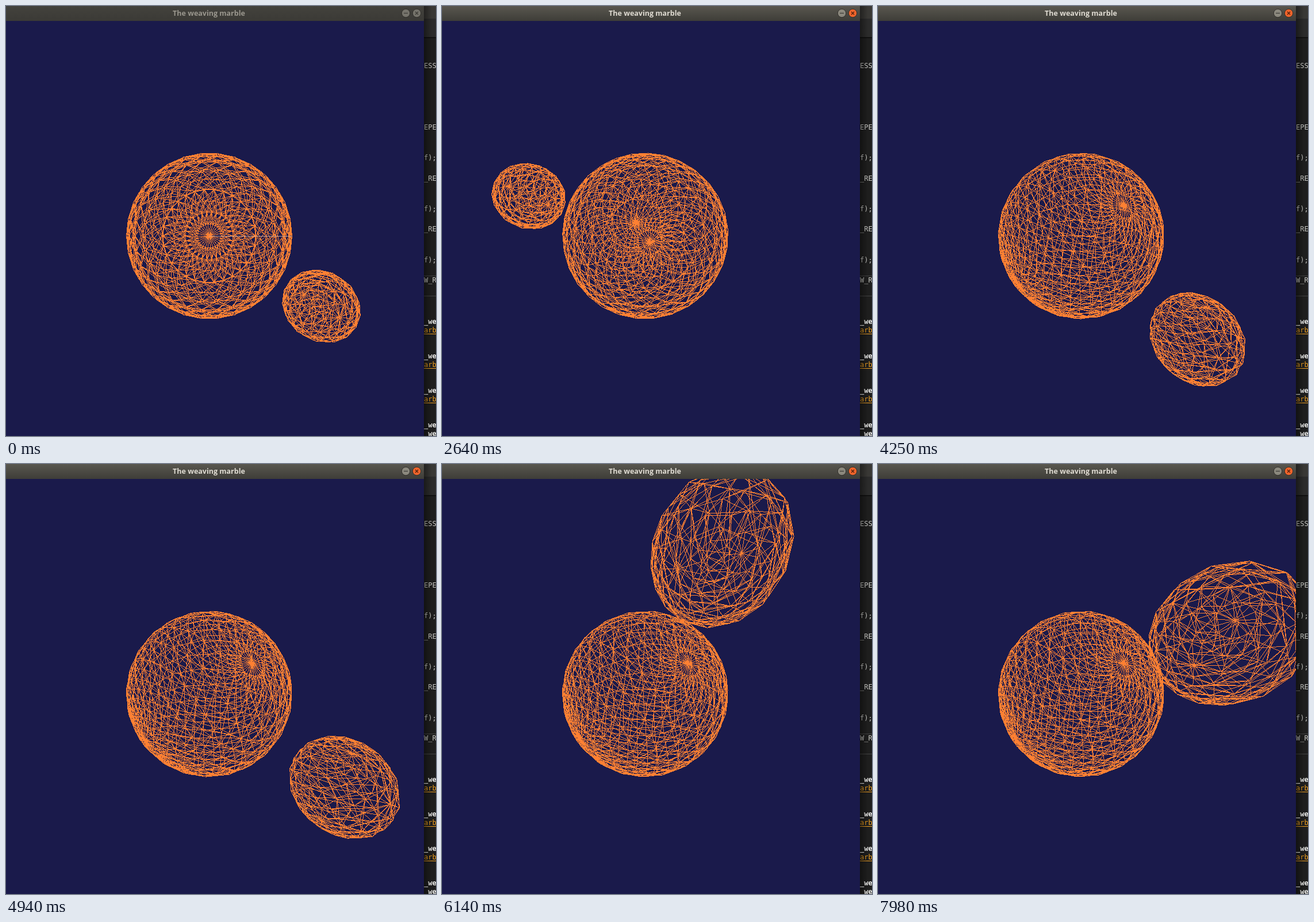
Animation of 748x748 px, one loop 8000 ms. Source, as an HTML page with a canvas:

```html
<!DOCTYPE html>
<html lang="en">
<head>
<meta charset="utf-8">
<title>Wireframe orbit</title>
<style>
html, body { margin: 0; width: 100%; height: 100%; overflow: hidden; background: #1e1e1e; }
canvas { display: block; width: 748px; height: 748px; }
</style>
</head>
<body>
<canvas id="stage" width="748" height="748"></canvas>
<script>
const ctx = document.getElementById('stage').getContext('2d');
const LOOP = 8000, RAD = Math.PI / 180;
const W = 727, H = 722, TOP = 26;
const CX = 353.5, CY = 400, FOCAL = 374, DIST = 5;
const ORBIT = 3, PLANET_R = 1.8, MOON_R = 0.8;
// Colours as ABGR words for the pixel buffer.
const ORANGE = 0xff3380ff, NIGHT = 0xff4b1a1a, SEAM = 0xff8fa6d5;
const image = ctx.createImageData(W, H);
const pixels = new Uint32Array(image.data.buffer);

// Vector helpers: x right, y down, z away from the viewer.
const dot = (a, b) => a[0] * b[0] + a[1] * b[1] + a[2] * b[2];
const mix = (a, b, k) => a.map((v, i) => v + (b[i] - v) * k);
const mul = (a, k) => a.map(v => v * k);
const unit = a => mul(a, 1 / Math.hypot(...a));
const cross = (a, b) => [
  a[1] * b[2] - a[2] * b[1],
  a[2] * b[0] - a[0] * b[2],
  a[0] * b[1] - a[1] * b[0]
];

// Axes from the far pole and a direction in the orbit plane lying at `deg`.
function makeFrame(pole, dir, deg) {
  const n = mul(unit(pole), -1);
  const d = dot(dir, n);
  const u = unit(dir.map((v, i) => v - d * n[i]));
  const v = cross(n, u);
  const c = Math.cos(deg * RAD), s = Math.sin(deg * RAD);
  const e1 = u.map((w, i) => c * w - s * v[i]);
  return { e1, e2: cross(n, e1), n };
}

const blend = (a, b, k) =>
  makeFrame(mul(mix(a.n, b.n, k), -1), mix(a.e1, b.e1, k), 0);

// Linear interpolation through [time, ...values] keys.
function track(keys, t) {
  if (t <= keys[0][0]) return keys[0].slice(1);
  for (let i = 1; i < keys.length; i++) {
    const a = keys[i - 1], b = keys[i];
    if (t < b[0]) return mix(a, b, (t - a[0]) / (b[0] - a[0])).slice(1);
  }
  return keys[keys.length - 1].slice(1);
}

const VIEWS = [
  makeFrame([0, 0, 1], [1, 0, 0], 0),
  makeFrame([0.552, 0.775, 0.308], [0.188, -0.449, 0.873], -252.5),
  makeFrame([0.664, -0.475, 0.577], [0.752, 0.503, -0.424], -276.3)
];
const VIEW_KEYS = [[2520, 0], [3450, 1], [4030, 2]];
const MOON_KEYS = [
  [0, -32], [4120, -295.3], [4680, -259.3], [4940, -276.3], [5268, -297.3],
  [5770, -263.3], [6140, -202.2], [6550, -164.3], [6700, -152.3],
  [6930, -155.5], [7980, -226.3], [8000, -227.6]
];
const SPIN_KEYS = [[4120, 0], [4680, 71.4], [5268, 71.4], [5770, 137], [6140, 224], [6550, 320]];
const CURSOR_KEYS = [[600, 261, 348], [900, 420, 500], [1300, 531, 514], [1900, 531, 514], [2480, 700, 560]];

function viewAt(t) {
  const [pos] = track(VIEW_KEYS, t);
  const i = Math.min(1, Math.floor(pos));
  return blend(VIEWS[i], VIEWS[i + 1], pos - i);
}

// Hard-edged line, one pixel wide.
function line([x0, y0], [x1, y1], color) {
  const steps = Math.max(1, Math.ceil(Math.max(Math.abs(x1 - x0), Math.abs(y1 - y0))));
  const dx = (x1 - x0) / steps, dy = (y1 - y0) / steps;
  for (let i = 0; i <= steps; i++) {
    const x = Math.floor(x0 + dx * i), y = Math.floor(y0 + dy * i) - TOP;
    if (x >= 0 && x < W && y >= 0 && y < H) pixels[y * W + x] = color;
  }
}

function sphere(frame, centre, radius, slices, stacks, spin) {
  const { e1, e2, n } = frame;
  const rows = [];
  for (let i = 0; i <= stacks; i++) {
    const th = Math.PI * i / stacks;
    const h = radius * Math.cos(th), w = radius * Math.sin(th);
    const row = [];
    for (let j = 0; j < slices; j++) {
      const b = spin * RAD + 2 * Math.PI * j / slices;
      const x = w * Math.cos(b), y = w * Math.sin(b);
      const p = centre.map((c, k) => c + x * e1[k] + y * e2[k] + h * n[k]);
      const s = FOCAL / (DIST + p[2]);
      row.push([CX + p[0] * s, CY + p[1] * s]);
    }
    rows.push(row);
  }
  for (let i = 0; i < stacks; i++) {
    for (let j = 0; j < slices; j++) {
      const a = rows[i][j];
      line(a, rows[i][(j + 1) % slices], ORANGE);
      for (const shift of [-1, 1, 2]) {
        line(a, rows[i + 1][(j + shift + slices) % slices], ORANGE);
      }
    }
  }
  return rows;
}

function drawScene(t) {
  const frame = viewAt(t);
  const angle = track(MOON_KEYS, t)[0];
  const c = ORBIT * Math.cos(angle * RAD), s = ORBIT * Math.sin(angle * RAD);
  const centre = frame.e1.map((v, i) => c * v + s * frame.e2[i]);
  pixels.fill(NIGHT);
  const rows = sphere(frame, [0, 0, 0], PLANET_R, 30, 15, track(SPIN_KEYS, t)[0]);
  if (t < 2520) {
    for (let i = 1; i < 8; i++) line(rows[i - 1][0], rows[i][0], SEAM);
  }
  sphere(frame, centre, MOON_R, 15, 10, angle);
  ctx.putImageData(image, 0, TOP);
}

function write(text, x, y, font, color) {
  ctx.font = font;
  ctx.fillStyle = color;
  ctx.fillText(text, x, y);
}

function drawEditor() {
  const mono = '12px "DejaVu Sans Mono", monospace';
  ctx.fillStyle = '#1e1e1e';
  ctx.fillRect(727, 0, 21, 748);
  ctx.fillStyle = '#393835';
  ctx.fillRect(727, 0, 21, 22);
  ctx.fillStyle = '#2b2b2b';
  ctx.fillRect(727, 22, 21, 32);
  ctx.fillStyle = '#111';
  ctx.fillRect(727, 54, 21, 2);
  ctx.fillStyle = '#444';
  ctx.fillRect(727, 469, 21, 1);
  ctx.fillRect(727, 504, 21, 1);
  ctx.textAlign = 'left';
  const code = [['ESS', 108], ['EPE', 215], ['f);', 268], ['_RE', 304],
    ['f);', 357], ['_RE', 392], ['f);', 446], ['W_R', 481]];
  for (const [s, y] of code) write(s, 727, y, mono, '#c8c8c4');
  for (let i = 0; i < 4; i++) {
    const y = 553 + i * 60;
    write('_we', 727, y, 'bold ' + mono, '#eeeeec');
    write(i < 3 ? 'arb' : '_we', 727, y + 15, (i < 3 ? '' : 'bold ') + mono, i < 3 ? '#f0a020' : '#eeeeec');
    if (i < 3) ctx.fillRect(727, y + 17, 21, 1);
  }
  const shade = ctx.createLinearGradient(727, 0, 741, 0);
  shade.addColorStop(0, 'rgba(0,0,0,.4)');
  shade.addColorStop(1, 'rgba(0,0,0,0)');
  ctx.fillStyle = shade;
  ctx.fillRect(727, 0, 14, 748);
}

function button(x, fill, mark, close) {
  ctx.beginPath();
  ctx.arc(x, 12.5, 7.2, 0, 7);
  ctx.fillStyle = fill;
  ctx.fill();
  ctx.strokeStyle = '#2f2e2a';
  ctx.lineWidth = 1;
  ctx.stroke();
  ctx.beginPath();
  if (close) {
    ctx.moveTo(x - 2.5, 10); ctx.lineTo(x + 2.5, 15);
    ctx.moveTo(x + 2.5, 10); ctx.lineTo(x - 2.5, 15);
  } else {
    ctx.moveTo(x - 3.5, 12.5); ctx.lineTo(x + 3.5, 12.5);
  }
  ctx.strokeStyle = mark;
  ctx.lineWidth = 1.2;
  ctx.stroke();
}

function drawTitle(active) {
  const bar = ctx.createLinearGradient(0, 0, 0, 26);
  bar.addColorStop(0, active ? '#59574f' : '#43423d');
  bar.addColorStop(1, active ? '#3e3d38' : '#3b3a36');
  ctx.fillStyle = bar;
  ctx.fillRect(0, 0, 727, 26);
  ctx.textAlign = 'center';
  write('The weaving marble', 353, 17, 'bold 12.5px "Open Sans", "Noto Sans", sans-serif',
    active ? '#dfdbd2' : '#9a978e');
  button(695.5, active ? '#8b887d' : '#75736b', '#3a3934', false);
  button(714.5, active ? '#f0642b' : '#75736b', active ? '#4a1d0c' : '#3a3934', true);
}

function drawCursor(t) {
  if (t < 600 || t > 2480) return;
  const [x, y] = track(CURSOR_KEYS, t);
  ctx.beginPath();
  [[0, 0], [0, 14], [3, 11], [5.5, 16.5], [8, 15.5], [5.5, 10], [9.5, 10]]
    .forEach(([a, b]) => ctx.lineTo(x + a, y + b));
  ctx.closePath();
  ctx.fillStyle = '#fff';
  ctx.fill();
  ctx.strokeStyle = '#222';
  ctx.lineWidth = 0.8;
  ctx.stroke();
}

function render(now) {
  const t = now % LOOP;
  drawScene(t);
  drawEditor();
  drawTitle(t >= 900);
  drawCursor(t);
}

const start = performance.now();
function tick() {
  render(performance.now() - start);
  requestAnimationFrame(tick);
}
tick();
</script>
</body>
</html>
```
